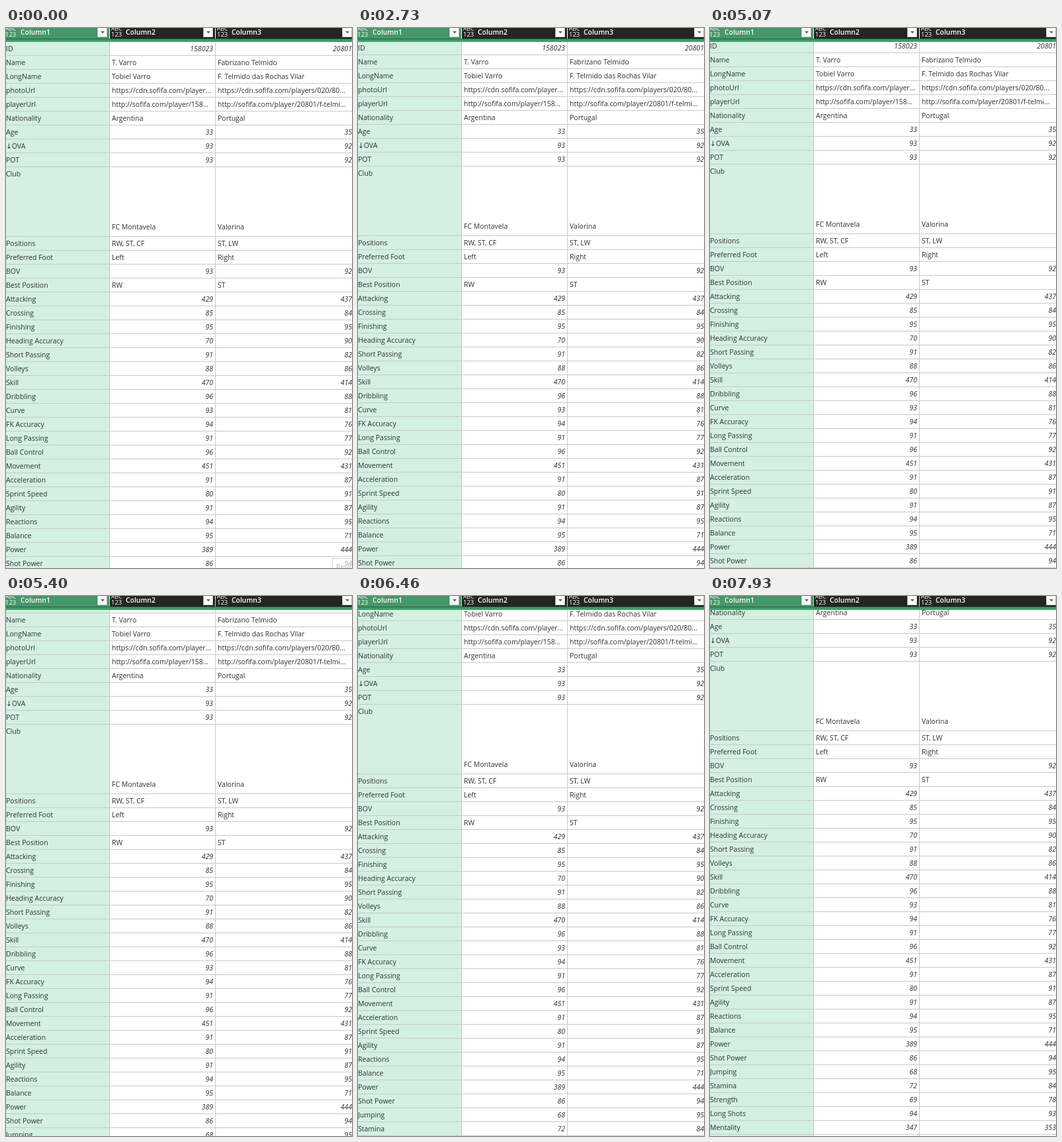
Recreate the animation shown at these times as an HTML page. Size 523 px wide and 815 px high, loop 7990 ms.

```html
<!DOCTYPE html>
<html lang="en">
<head>
<meta charset="utf-8">
<title>Player table</title>
<style>
html, body { margin: 0; width: 100%; height: 100%; overflow: hidden; background: #fff; }
#stage {
  position: relative; width: 523px; height: 815px; overflow: hidden; background: #fff;
  font: 10.5px "Open Sans", "Noto Sans", "DejaVu Sans", sans-serif; color: #303030;
}
#stage div { position: absolute; box-sizing: border-box; white-space: pre; }
#rows { left: 0; top: 21px; width: 523px; }
.row { left: 0; width: 523px; border-bottom: 1px solid #c9c9c9; }
.cell { top: 0; height: 100%; overflow: hidden; line-height: 20px; }
.cell:nth-child(1) { left: 0; width: 157px; background: #d3f0e0; border-right: 1px solid #c9c9c9; }
.cell:nth-child(2) { left: 157px; width: 160px; padding: 0 3px; border-right: 1px solid #c9c9c9; }
.cell:nth-child(3) { left: 317px; width: 206px; padding-left: 3px; }
#stage .num { font-style: italic; text-align: right; }
#stage .low { padding-top: 80px; }
#bar { left: 0; top: 16px; width: 523px; height: 5px; background: #3f9c68; border-top: 1px solid #2c5f43; }
.head { top: 0; height: 16px; background: #252525; color: #fff; overflow: hidden; }
.title { top: -4px; line-height: 20px; font-weight: 600; font-size: 10.4px; }
.abc { top: -5px; line-height: 12px; font-size: 8.5px; }
.digits { top: 4px; line-height: 12px; font-size: 9.5px; }
.button { top: -1px; width: 15px; height: 15px; background: #fff; border: 1px solid #b5b5b5; }
.button::after {
  content: ""; position: absolute; left: 4px; top: 5px;
  border: 3px solid transparent; border-top-color: #555; border-bottom: 0;
}
#tip {
  left: 493px; top: 800px; width: 60px; height: 24px; padding-left: 5px; line-height: 25px;
  background: rgba(255, 255, 255, .6); border: 1px solid #d0d0d0; color: #b8b8b8;
}
</style>
</head>
<body>
<div id="stage">
  <div id="rows"></div>
  <div id="bar"></div>
  <div id="tip">Ress</div>
</div>
<script>
const LOOP = 7990;
const stage = document.getElementById('stage');
const rows = document.getElementById('rows');

const table = `ID|158023|20801
Name|T. Varro|Fabrizano Telmido
LongName|Tobiel Varro|F. Telmido das Rochas Vilar
photoUrl|https://cdn.sofifa.com/player...|https://cdn.sofifa.com/players/020/80...
playerUrl|http://sofifa.com/player/158...|http://sofifa.com/player/20801/f-telmi...
Nationality|Argentina|Portugal
Age|33|35
↓OVA|93|92
POT|93|92
Club|FC Montavela|Valorina
Positions|RW, ST, CF|ST, LW
Preferred Foot|Left|Right
BOV|93|92
Best Position|RW|ST
Attacking|429|437
Crossing|85|84
Finishing|95|95
Heading Accuracy|70|90
Short Passing|91|82
Volleys|88|86
Skill|470|414
Dribbling|96|88
Curve|93|81
FK Accuracy|94|76
Long Passing|91|77
Ball Control|96|92
Movement|451|431
Acceleration|91|87
Sprint Speed|80|91
Agility|91|87
Reactions|94|95
Balance|95|71
Power|389|444
Shot Power|86|94
Jumping|68|95
Stamina|72|84
Strength|69|78
Long Shots|94|93
Mentality|347|353
Aggression|44|63`;

function add(parent, className, text = '', style = {}) {
  const el = document.createElement('div');
  el.className = className;
  el.textContent = text;
  Object.assign(el.style, style);
  parent.append(el);
  return el;
}

let rowTop = 0;
for (const line of table.split('\n')) {
  const cells = line.split('|');
  const isClub = cells[0] === 'Club';
  const height = isClub ? 105 : 21;
  const row = add(rows, 'row', '', { top: rowTop + 'px', height: height + 'px' });
  cells.forEach((text, i) => {
    const kind = /^\d+$/.test(text) ? ' num' : isClub && i ? ' low' : '';
    add(row, 'cell' + kind, text);
  });
  rowTop += height;
}

// Column headers: left edge, width, icon x, title x, button x
[[0, 156, -1, 22, 138], [157, 159, 2, 24, 141], [317, 206, 2, 24, 191]].forEach(
  ([left, width, icon, title, button], i) => {
    const head = add(stage, 'head', '', { left: left + 'px', width: width + 'px' });
    if (!i) head.style.background = '#459769';
    add(head, 'abc', 'ABC', { left: icon + 'px' });
    add(head, 'digits', '123', { left: icon + 'px' });
    add(head, 'title', 'Column' + (i + 1), { left: title + 'px' });
    add(head, 'button', '', { left: button + 'px' });
  });

// Scroll position over time: [ms, px]
const steps = [[0, 0], [2730, 1], [2930, 2], [3460, 4], [3600, 5], [3790, 6],
  [4130, 4], [4200, 3], [4270, 2], [4340, 1]];

// The faster scroll moves on a regular tick: [tick, px]
const anchors = [[-1, 1], [5, 16], [21, 46], [30, 83], [36, 106], [39, 111], [41, 111], [42, 110], [43, 111]];
for (let tick = 0; tick <= 43; tick++) {
  const next = anchors.findIndex(([t]) => t >= tick);
  const [t0, y0] = anchors[next - 1];
  const [t1, y1] = anchors[next];
  const y = Math.round(y0 + (y1 - y0) * (tick - t0) / (t1 - t0));
  steps.push([Math.floor((5070 + 66.6 * tick) / 10) * 10, y]);
}

function play(el, frames) {
  const held = frames.map(f => ({ ...f, easing: 'step-end' }));
  held.push({ ...held[held.length - 1], offset: 1 });
  el.animate(held, { duration: LOOP, iterations: Infinity });
}

play(rows, steps.map(([ms, y]) => ({ offset: ms / LOOP, transform: `translateY(${-y}px)` })));
play(document.getElementById('tip'), [{ offset: 0, opacity: 1 }, { offset: 70 / LOOP, opacity: 0 }]);
</script>
</body>
</html>
```
